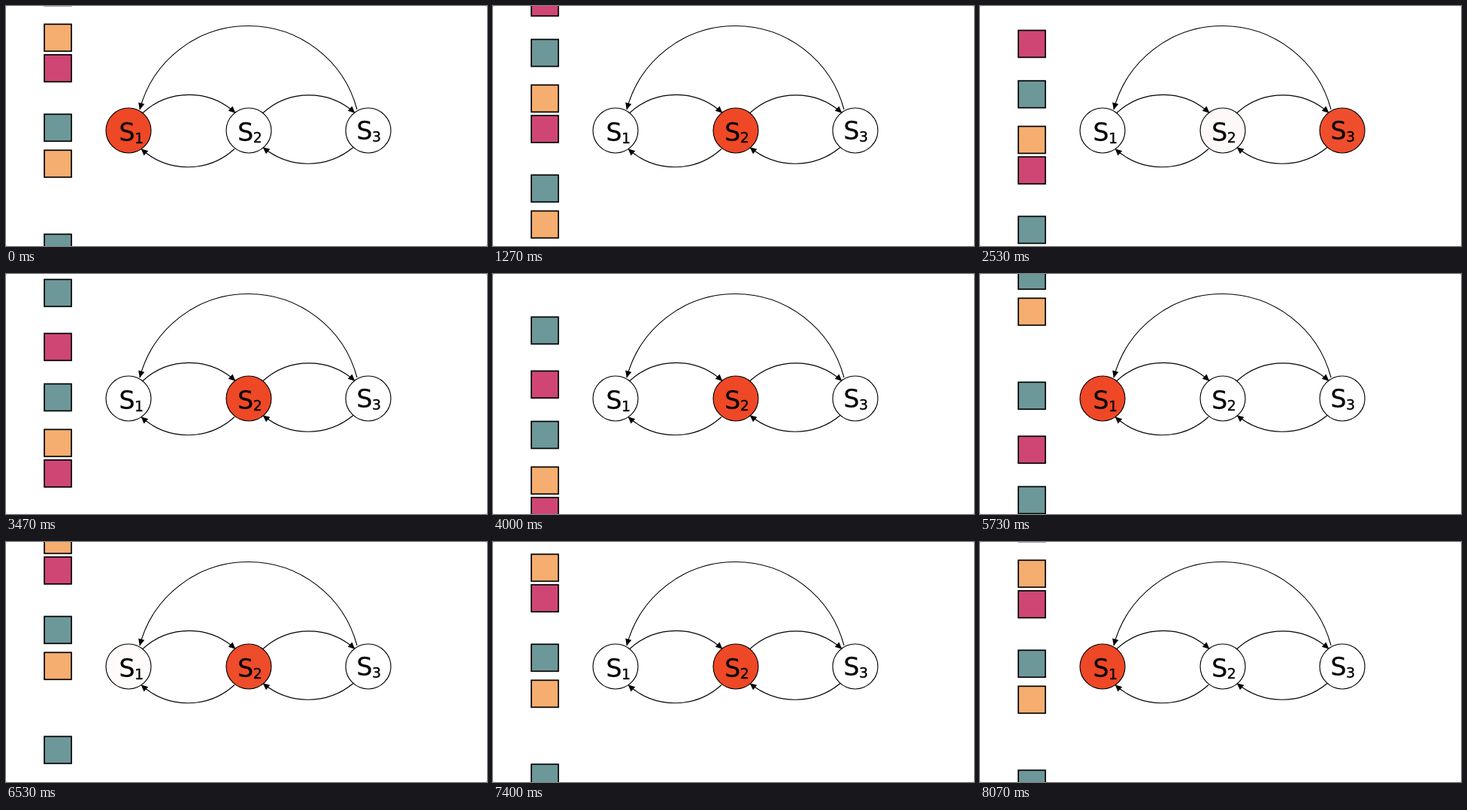
An HTML page that plays this animation: 640 by 320 pixels, repeating every 8.14 s.

```html
<!DOCTYPE html>
<html lang="en">
<head>
<meta charset="utf-8">
<title>State machine</title>
<style>
  html, body { margin: 0; width: 100%; height: 100%; overflow: hidden; background: #c4c4c4; }
  svg { display: block; width: 640px; height: 320px; }
  text { font-family: "DejaVu Sans", Verdana, sans-serif; font-size: 33px; stroke: #000; stroke-width: .3; }
  .sub { font-size: 19px; }
  .line { fill: none; stroke: #000; stroke-width: 1.15; }
</style>
</head>
<body>
<svg id="stage" viewBox="0 0 640 320">
  <rect width="640" height="320" rx="2.5" fill="#fff"/>
</svg>
<script>
const LOOP = 8140, PERIOD = 480, SIZE = 36;
const FADE = 600, LAG = 250; // a fade ends LAG after the tape has stopped
const RED = [238, 72, 38];
const TEAL = '#6d989a', PINK = '#cf4675', ORANGE = '#f5ae6f';
const stage = document.getElementById('stage');

function add(tag, attrs, text) {
  const el = document.createElementNS('http://www.w3.org/2000/svg', tag);
  for (const k in attrs) el.setAttribute(k, attrs[k]);
  if (text) el.textContent = text;
  stage.appendChild(el);
  return el;
}

// Circular arc between two points at height y, bulging to height peak
function arrow(x1, x2, y, peak) {
  const half = Math.abs(x2 - x1) / 2, sag = Math.abs(peak - y);
  const r = (half * half + sag * sag) / (2 * sag);
  const bend = 2 * Math.atan(sag / half) * 180 / Math.PI;
  const clockwise = (x2 > x1) === (peak < y);
  const angle = (x2 > x1 ? 0 : 180) + (clockwise ? bend : -bend);
  add('path', { class: 'line', d: `M${x1} ${y} A${r} ${r} 0 0 ${+clockwise} ${x2} ${y}` });
  add('path', { d: 'M.5 0 L-8.7 -4.2 V4.2 Z', transform: `translate(${x2} ${y}) rotate(${angle})` });
}

arrow(182, 305, 142.5, 118.3);
arrow(342, 464, 142.5, 118.8);
arrow(304, 180, 190.5, 214.7);
arrow(462, 342, 188.5, 210.2);
arrow(467, 178, 138, 26.5);

// Centre of the circle, left edge and baseline of its label
const states = [[163, 150.5, 180], [323, 308.3, 179.7], [482, 466.5, 178]].map(([cx, x, y], i) => {
  const circle = add('circle', { class: 'line', cx, cy: 166, r: 30 });
  add('text', { x, y }, 'S');
  add('text', { class: 'sub', x: x + 20.5, y: y + 2.5 }, String(i + 1));
  return circle;
});

// Each square: colour, height at time 0, then the move that brings it to the
// machine: tape position reached, start, stop and the state it switches to
const squares = [
  [PINK, 83, 81, 0, 880, 1],
  [ORANGE, 42.3, 121, 1250, 2300, 2],
  [TEAL, -18.5, 183, 2304, 3200, 1],
  [PINK, -85.7, 248, 3560, 4450, 2],
  [TEAL, -157.7, 320, 4840, 5480, 0],
  [ORANGE, -269.7, 435, 5820, 6295, 1],
  [TEAL, 162.3 - PERIOD, PERIOD, 6930, 7800, 0]
].map(([fill, y, reach, start, stop, next]) => ({
  y, reach, start, stop, next,
  el: add('rect', { x: 51, width: SIZE, height: SIZE, fill, stroke: '#000', 'stroke-width': 1.7 })
}));

const clamp = v => Math.max(0, Math.min(1, v));

// Cubic ease with control points (.4, 0) and (.2, 1)
function ease(x) {
  if (x <= 0 || x >= 1) return clamp(x);
  let lo = 0, hi = 1, s = .5;
  for (let i = 0; i < 24; i++) {
    s = (lo + hi) / 2;
    const q = 1 - s;
    if (1.2 * q * q * s + .6 * q * s * s + s * s * s < x) lo = s; else hi = s;
  }
  return s * s * (3 - 2 * s);
}

function draw(t) {
  let pos = 0, from = 0, lit = [1, 0, 0];
  for (const { reach, start, stop, next } of squares) {
    pos += (reach - from) * ease((t - start) / (stop - start));
    from = reach;
    const k = clamp((t - stop - LAG) / FADE + 1);
    lit = lit.map((v, i) => v * (1 - k) + (i === next ? k : 0));
  }
  states.forEach((el, i) => {
    el.style.fill = `rgb(${RED.map(c => Math.round(255 + (c - 255) * lit[i]))})`;
  });
  for (const { y, el } of squares) {
    const top = (y + pos + SIZE + PERIOD) % PERIOD - SIZE;
    el.setAttribute('y', (top - SIZE / 2).toFixed(2));
  }
}

const begin = performance.now();
function tick() {
  draw((performance.now() - begin) % LOOP);
  requestAnimationFrame(tick);
}
draw(0);
requestAnimationFrame(tick);
</script>
</body>
</html>
```
